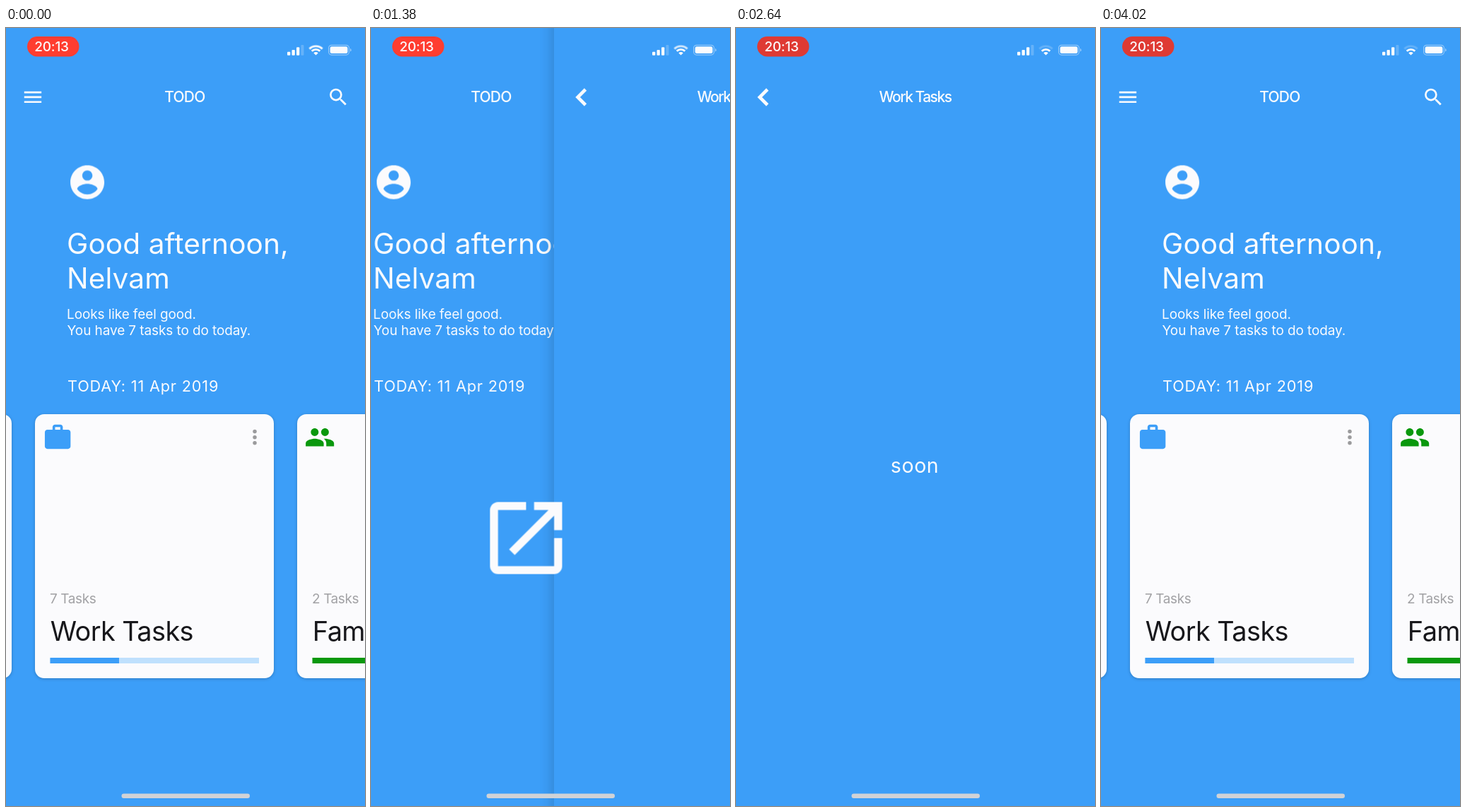
An HTML page that plays this animation: 508 by 1102 pixels, repeating every 4080 ms.

```html
<!DOCTYPE html>
<html lang="en">
<head>
<meta charset="utf-8">
<title>Todo app</title>
<style>
  html, body { margin: 0; width: 100%; height: 100%; overflow: hidden; background: #3c9ef8; }
  svg { display: block; width: 100%; height: 100%; }
  text { font-family: Inter, "Liberation Sans", sans-serif; fill: #fbfbfd; white-space: pre; }

  .nav { font-size: 21px; font-weight: 500; letter-spacing: -.8px; }
  .nav.tight { letter-spacing: -1.5px; }
  .hello { font-size: 40.6px; letter-spacing: .1px; }
  .note { font-size: 19px; letter-spacing: -.1px; }
  .date { font-size: 21.7px; letter-spacing: .83px; }
  .count { font-size: 19px; letter-spacing: -.4px; fill: #a2a2a5; }
  .name { font-size: 37.9px; letter-spacing: -.6px; fill: #17171b; }
  .soon { font-size: 28.5px; letter-spacing: .6px; }
  .clock { font-size: 19px; font-weight: 500; letter-spacing: -.2px; }
  .sheet { fill: #fbfbfd; filter: drop-shadow(0 1px 2px rgba(0, 0, 0, .22)); }
  .light { fill: #fbfbfd; }

  /* Every part shares one 4080 ms loop. */
  .home, .page, .shade, .fly, .card, .soon, .in, .out, .pill, .far {
    animation: 4080ms linear infinite;
  }
  .home, .page, .shade { animation-timing-function: cubic-bezier(.35, .91, .33, .97); }
  .card, .soon, .in, .out { animation-timing-function: step-end; }
  .home  { animation-name: home; }
  .page  { animation-name: page; }
  .shade { animation-name: shade; }
  .pill  { animation-name: pill; }
  .far   { animation-name: far; }
  .card  { animation-name: card; }
  .soon  { animation-name: soon; }
  .in    { animation-name: in; }
  .out   { animation-name: out; }
  .fly.rise { animation-name: rise; }
  .fly.drop { animation-name: drop; }

  @keyframes page {
    0%, 32.598% { transform: translateX(508px); }
    39.167%, 79.657% { transform: translateX(0); }
    86.225%, 100% { transform: translateX(508px); }
  }
  @keyframes home {
    0%, 32.598% { transform: translateX(0); }
    39.167%, 79.657% { transform: translateX(-169.33px); }
    86.225%, 100% { transform: translateX(0); }
  }
  @keyframes shade {
    0%, 32.598% { opacity: 0; }
    39.167%, 79.657% { opacity: 1; }
    86.225%, 100% { opacity: 0; }
  }
  /* The flying icon follows a circular arc between card and page centre. */
  @keyframes rise {
    0%, 32.598% {
      transform: translate(81.1px, 618.75px) rotate(41.81deg) translate(172.9px, 0) rotate(-41.81deg);
      animation-timing-function: cubic-bezier(.4, 0, .2, 1);
    }
    39.167%, 100% {
      transform: translate(81.1px, 618.75px) rotate(0deg) translate(172.9px, 0) rotate(0deg);
    }
  }
  @keyframes drop {
    0%, 79.657% {
      transform: translate(382.9px, 734px) rotate(221.81deg) translate(172.9px, 0) rotate(-221.81deg);
      animation-timing-function: cubic-bezier(.8, 0, .6, 1);
    }
    86.225%, 100% {
      transform: translate(382.9px, 734px) rotate(180deg) translate(172.9px, 0) rotate(-180deg);
    }
  }
  @keyframes card {
    0% { opacity: 1; }
    32.598% { opacity: 0; }
    86.225%, 100% { opacity: 1; }
  }
  @keyframes soon {
    0% { opacity: 0; }
    39.7% { opacity: 1; }
    79.657%, 100% { opacity: 0; }
  }
  @keyframes in {
    0% { opacity: 0; }
    32.598% { opacity: 1; }
    39.7%, 100% { opacity: 0; }
  }
  @keyframes out {
    0% { opacity: 0; }
    79.657% { opacity: 1; }
    86.225%, 100% { opacity: 0; }
  }
  @keyframes pill {
    0%, 1.74% { fill: #ff3d30; }
    10.02%, 23.8% { fill: #df3a33; }
    32.08%, 45.86% { fill: #ff3d30; }
    54.14%, 67.92% { fill: #df3a33; }
    76.2%, 89.98% { fill: #ff3d30; }
    98.26%, 100% { fill: #df3a33; }
  }
  @keyframes far {
    0%, 32.8% { opacity: 1; }
    37%, 100% { opacity: .22; }
  }
</style>
</head>
<body>
<svg viewBox="0 0 508 1102" preserveAspectRatio="none">
  <defs>
    <linearGradient id="edge">
      <stop offset="0" stop-opacity="0"/>
      <stop offset=".3" stop-opacity=".016"/>
      <stop offset=".6" stop-opacity=".07"/>
      <stop offset="1" stop-opacity=".22"/>
    </linearGradient>
  </defs>
  <rect width="508" height="1102" fill="#3c9ef8"/>

  <g class="home">
    <path class="light" transform="translate(21.7 81.7) scale(1.355)" d="M3 18h18v-2H3v2zm0-5h18v-2H3v2zm0-7v2h18V6H3z"/>
    <text class="nav" x="224.3" y="105.3">TODO</text>
    <path class="light" transform="translate(454 81.7) scale(1.355)" d="M15.5 14h-.79l-.28-.27A6.47 6.47 0 0 0 16 9.5 6.5 6.5 0 1 0 9.5 16c1.61 0 3.09-.59 4.23-1.57l.27.28v.79l5 4.99L20.49 19l-4.99-5zm-6 0C7.01 14 5 11.99 5 9.5S7.01 5 9.5 5 14 7.01 14 9.5 11.99 14 9.5 14z"/>
    <path class="light" transform="translate(86.3 189.7) scale(2.4)" d="M12 2C6.48 2 2 6.48 2 12s4.48 10 10 10 10-4.48 10-10S17.52 2 12 2zm0 3c1.66 0 3 1.34 3 3s-1.34 3-3 3-3-1.34-3-3 1.34-3 3-3zm0 14.2c-2.5 0-4.71-1.28-6-3.22.03-1.99 4-3.08 6-3.08 1.99 0 5.97 1.09 6 3.08-1.29 1.94-3.5 3.22-6 3.22z"/>
    <text class="hello" x="86" y="320">Good afternoon,</text>
    <text class="hello" x="86" y="369">Nelvam</text>
    <text class="note" x="86" y="411.5">Looks like feel good.</text>
    <text class="note" x="86.5" y="434.5">You have 7 tasks to do today.</text>
    <text class="date" x="87" y="515">TODAY: 11 Apr 2019</text>

    <rect class="sheet" x="-330" y="547" width="338" height="374" rx="13"/>

    <g class="card">
      <rect class="sheet" x="41" y="547" width="338" height="374" rx="13"/>
      <path fill="#3c9ef8" transform="translate(51.3 558) scale(1.82)" d="M20 6h-4V4c0-1.11-.89-2-2-2h-4c-1.11 0-2 .89-2 2v2H4c-1.11 0-1.99.89-1.99 2L2 19c0 1.11.89 2 2 2h16c1.11 0 2-.89 2-2V8c0-1.11-.89-2-2-2zm-6 0h-4V4h4v2z"/>
      <g fill="#9b9b9d">
        <circle cx="352" cy="571.6" r="2.75"/>
        <circle cx="352" cy="579.7" r="2.75"/>
        <circle cx="352" cy="587.8" r="2.75"/>
      </g>
      <text class="count" x="62" y="814.5">7 Tasks</text>
      <text class="name" x="62.8" y="868">Work Tasks</text>
      <rect x="62.5" y="892" width="295.5" height="8" fill="#bfe0fd"/>
      <rect x="62.5" y="892" width="97.5" height="8" fill="#3c9ef8"/>
    </g>

    <g transform="translate(371)">
      <rect class="sheet" x="41" y="547" width="338" height="374" rx="13"/>
      <path fill="#0a980d" transform="translate(51.3 558) scale(1.82)" d="M16 11c1.66 0 2.99-1.34 2.99-3S17.66 5 16 5c-1.66 0-3 1.34-3 3s1.34 3 3 3zm-8 0c1.66 0 2.99-1.34 2.99-3S9.66 5 8 5C6.34 5 5 6.34 5 8s1.34 3 3 3zm0 2c-2.33 0-7 1.17-7 3.5V19h14v-2.5c0-2.33-4.67-3.5-7-3.5zm8 0c-.29 0-.62.02-.97.05 1.16.84 1.97 1.97 1.97 3.45V19h6v-2.5c0-2.33-4.67-3.5-7-3.5z"/>
      <text class="count" x="62" y="814.5">2 Tasks</text>
      <text class="name" x="62.8" y="868">Family Tasks</text>
      <rect x="62.5" y="892" width="295.5" height="8" fill="#0a980d"/>
    </g>
  </g>

  <g class="page">
    <rect class="shade" x="-25.4" width="25.4" height="1102" fill="url(#edge)"/>
    <rect width="520" height="1102" fill="#3c9ef8"/>
    <path fill="none" stroke="#fbfbfd" stroke-width="4.6" d="M44.5 87l-11 11 11 11"/>
    <text class="nav tight" x="202.5" y="105.3">Work Tasks</text>
    <text class="soon" x="218.8" y="630">soon</text>
  </g>

  <g class="fly rise">
    <path class="light in" transform="scale(5.67) translate(-12 -12)" d="M19 19H5V5h7V3H5c-1.11 0-2 .9-2 2v14c0 1.1.89 2 2 2h14c1.1 0 2-.9 2-2v-7h-2v7zM14 3v2h3.59l-9.83 9.83 1.41 1.41L19 6.41V10h2V3h-7z"/>
  </g>
  <g class="fly drop">
    <path class="light out" transform="scale(5.67) translate(-12 -12)" d="M19 12v7H5v-7H3v7c0 1.1.9 2 2 2h14c1.1 0 2-.9 2-2v-7h-2zm-6 .67l2.59-2.58L17 11.5l-5 5-5-5 1.41-1.41L11 12.67V3h2z"/>
  </g>

  <rect class="pill" x="30" y="12" width="73.5" height="28.5" rx="14.25" fill="#ff3d30"/>
  <text class="clock" x="40.3" y="33.3">20:13</text>
  <g class="light">
    <rect x="398" y="33.8" width="4.3" height="5" rx="1"/>
    <rect x="404.5" y="31" width="4.3" height="7.8" rx="1"/>
    <rect x="411" y="27.3" width="4.3" height="11.5" rx="1"/>
    <rect x="417.4" y="24" width="4" height="14.8" rx="1" opacity=".22"/>
  </g>
  <g transform="translate(438.5 38.6)" fill="none" stroke="#fbfbfd" stroke-width="2.9">
    <path class="far" d="M-9.1-9.1A12.9 12.9 0 0 1 9.1-9.1"/>
    <path d="M-5.8-5.8A8.2 8.2 0 0 1 5.8-5.8"/>
    <path class="light" stroke="none" d="M0 0L-3.2-3.2A4.6 4.6 0 0 1 3.2-3.2Z"/>
  </g>
  <rect x="456.6" y="24.3" width="28.8" height="13.8" rx="4" fill="none" stroke="#fbfbfd" stroke-opacity=".45" stroke-width="1.2"/>
  <rect class="light" x="458.6" y="26.3" width="24.8" height="9.8" rx="2.4"/>
  <path class="light" opacity=".5" d="M487 28.8a2.6 2.6 0 0 1 0 4.8z"/>
  <rect x="163.5" y="1084.5" width="181.5" height="6.6" rx="3.3" fill="#d0d2d6"/>
</svg>
</body>
</html>
```
